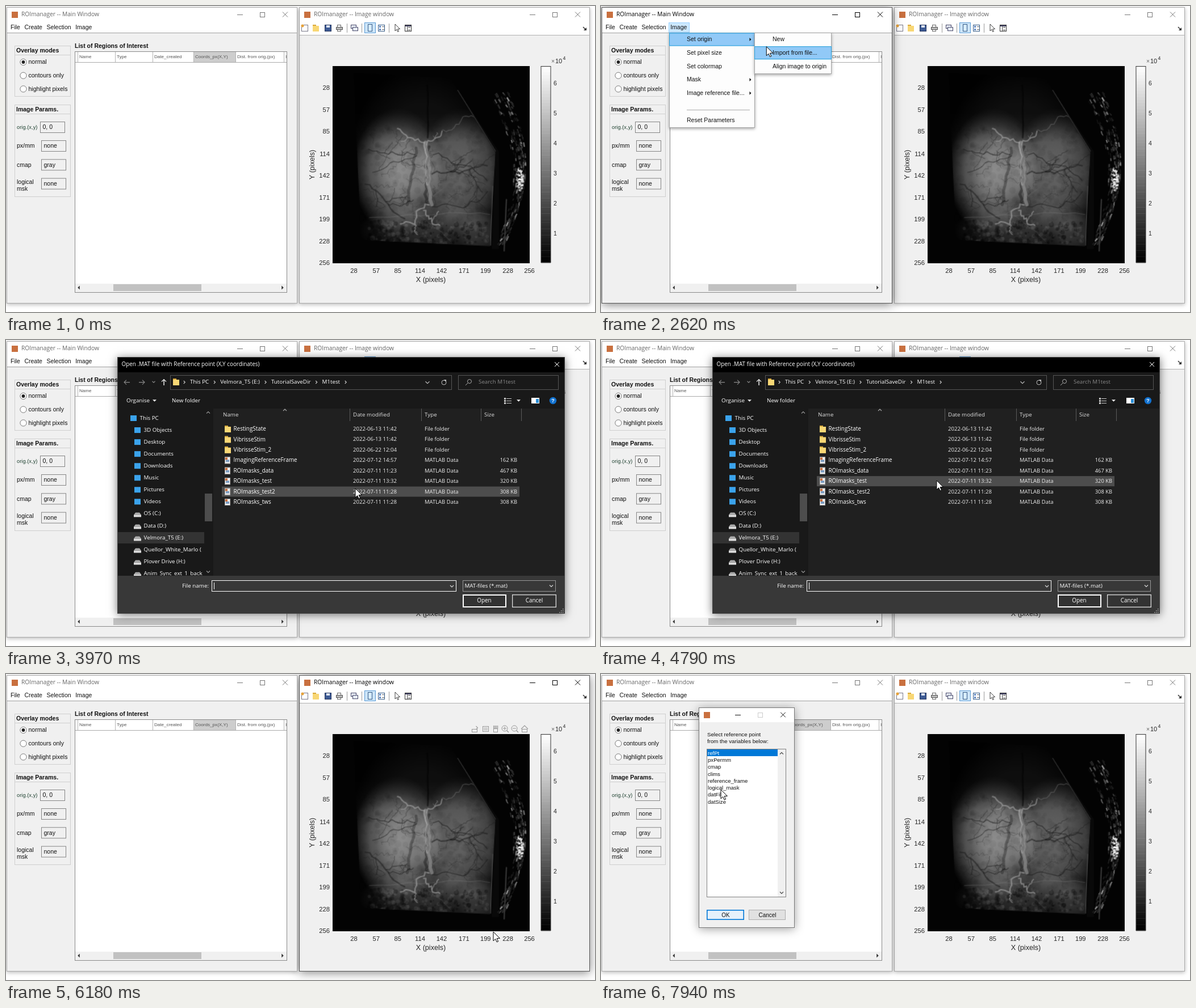
An HTML page with a canvas that plays this animation: 1037x540 px, repeating every 8 s.

```html
<!DOCTYPE html>
<html lang="en">
<head>
<meta charset="utf-8">
<title>ROI manager walkthrough</title>
<style>
html, body { margin: 0; width: 100%; height: 100%; overflow: hidden; background: #fff; }
canvas { display: block; }
</style>
</head>
<body>
<canvas id="stage" width="1037" height="540"></canvas>
<script>
const LOOP = 8000;
const ARIAL = '"Liberation Sans", Arial, sans-serif';
const UI = '"Open Sans", "Noto Sans", sans-serif';
const LOGO = '#c9703f';
const stage = document.getElementById('stage').getContext('2d');
let g = stage;

// ---- drawing helpers ----
function box(x, y, w, h, fill, stroke, lw = 1) {
  if (fill) { g.fillStyle = fill; g.fillRect(x, y, w, h); }
  if (stroke) {
    g.strokeStyle = stroke; g.lineWidth = lw;
    g.strokeRect(x + lw / 2, y + lw / 2, w - lw, h - lw);
  }
}
// Returns the x where the text ends, so that labels can follow each other.
function text(s, x, y, size = 10.5, color = '#111', font = ARIAL, align = 'left', weight = '') {
  g.font = `${weight} ${size}px ${font}`;
  g.fillStyle = color; g.textAlign = align; g.textBaseline = 'middle';
  g.fillText(s, x, y + .5);
  return x + g.measureText(s).width;
}
const ui = (s, x, y, color = '#fff', size = 9.8, align) => text(s, x, y, size, color, UI, align);
const bold = (s, x, y) => text(s, x, y, 10.5, '#111', ARIAL, 'left', 'bold');
function trace(p) {
  g.beginPath();
  for (let i = 0; i < p.length; i += 2) g.lineTo(p[i], p[i + 1]);
}
function line(color, lw, ...p) { g.strokeStyle = color; g.lineWidth = lw; trace(p); g.stroke(); }
function poly(fill, ...p) { g.fillStyle = fill; trace(p); g.fill(); }
function disc(x, y, r, fill, stroke) {
  g.beginPath(); g.arc(x, y, r, 0, 7);
  if (fill) { g.fillStyle = fill; g.fill(); }
  if (stroke) { g.strokeStyle = stroke; g.lineWidth = 1; g.stroke(); }
}
// Arrow heads; turn is in quarter turns, 0 points right.
function turned(x, y, turn, draw) {
  g.save(); g.translate(x, y); g.rotate(turn * Math.PI / 2); draw(); g.restore();
}
const chevron = (x, y, s, color, turn = 0) => turned(x, y, turn, () => line(color, 1.1, -s / 2, -s, s / 2, 0, -s / 2, s));
const triangle = (x, y, s, color, turn = 0) => turned(x, y, turn, () => poly(color, -s / 2, -s, s / 2, 0, -s / 2, s));
function cross(x, y, s, color) {
  line(color, 1, x - s, y - s, x + s, y + s);
  line(color, 1, x + s, y - s, x - s, y + s);
}
function panel(x, y, w, h, fill, border, blur, alpha) {
  g.save();
  g.shadowBlur = blur; g.shadowColor = `rgba(0,0,0,${alpha})`; g.shadowOffsetY = 2;
  box(x, y, w, h, fill);
  g.restore();
  if (border) box(x, y, w, h, null, border);
}
const clamp = v => Math.max(0, Math.min(1, v));
const smooth = v => v * v * (3 - 2 * v);
const ramp = (t, from, to) => smooth(clamp((t - from) / (to - from)));
// Draws a window that fades and grows around its centre.
function appear(x, y, alpha, draw) {
  const s = .92 + .08 * alpha;
  g.save();
  g.globalAlpha = alpha;
  g.translate(x, y); g.scale(s, s); g.translate(-x, -y);
  draw();
  g.restore();
}

// ---- microscope picture: painted once at 256 pixels, shown enlarged ----
let seed = 7;
const rnd = () => (seed = seed * 16807 % 2147483647) / 2147483647;
const gray = (v, a = 1) => `rgba(${v | 0},${v | 0},${v | 0},${a})`;

function glow(x, y, rx, ry, v) {
  g.save(); g.translate(x, y); g.scale(1, ry / rx);
  const r = g.createRadialGradient(0, 0, 0, 0, 0, rx);
  r.addColorStop(0, gray(v)); r.addColorStop(.6, gray(v, .75)); r.addColorStop(1, gray(v, 0));
  box(-rx, -rx, 2 * rx, 2 * rx, r);
  g.restore();
}
function vein(x, y, dx, dy, w, color, wobble = .12, branches = 3) {
  const n = 12, pts = [];
  let side = 0;
  for (let i = 0; i <= n; i++) {
    const u = i / n;
    side += (rnd() - .5) * wobble;
    pts.push(x + dx * u - dy * side, y + dy * u + dx * side);
  }
  g.lineJoin = g.lineCap = 'round';
  line(color, w, ...pts);
  g.lineJoin = 'miter'; g.lineCap = 'butt';
  for (let i = 0; i < branches; i++) {
    const k = 2 * (2 + Math.floor(rnd() * 8)), turn = (i % 2 ? 1 : -1) * (.5 + .5 * rnd()), s = .25 + .25 * rnd();
    const c = Math.cos(turn) * s, d = Math.sin(turn) * s;
    vein(pts[k], pts[k + 1], dx * c - dy * d, dx * d + dy * c, w * .6, color, wobble, w > 2 ? 1 : 0);
  }
}
function paintBrain() {
  const c = document.createElement('canvas');
  c.width = c.height = 256;
  g = c.getContext('2d');
  g.scale(256 / 347, 256 / 347);
  g.translate(-575, -106);
  box(575, 106, 347, 347, '#030303');
  g.save();
  trace([612, 118, 782, 128, 862, 255, 852, 423, 625, 412]);
  g.clip();
  g.globalCompositeOperation = 'lighter';
  glow(735, 270, 130, 165, 34);
  glow(690, 292, 80, 112, 82);
  glow(805, 292, 82, 112, 72);
  glow(700, 290, 50, 65, 28);
  glow(750, 395, 130, 50, 30);
  glow(838, 400, 45, 40, 30);
  g.globalCompositeOperation = 'source-over';
  const top = g.createLinearGradient(0, 190, 0, 240);
  top.addColorStop(0, gray(0, .5)); top.addColorStop(1, gray(0, 0));
  box(600, 110, 270, 130, top);

  // cloudy texture, denser along the lower edge
  for (let i = 0; i < 420; i++)
    disc(625 + 235 * rnd(), 210 + 170 * rnd(), 2 + 5 * rnd(), gray(0, .05));
  for (let i = 0; i < 260; i++)
    disc(635 + 215 * rnd(), 378 + 42 * rnd(), 1 + 3.5 * rnd(), rnd() < .65 ? gray(0, .28) : gray(150, .13));

  const dark = gray(25, .5);
  vein(634, 311, 78, 46, 2.6, dark);
  vein(638, 248, 80, -8, 1.7, dark);
  vein(645, 292, 78, -28, 1.4, dark);
  vein(750, 298, 95, 8, 2.6, dark);
  vein(752, 260, 100, 32, 1.8, dark);
  vein(752, 358, 95, -34, 1.7, dark);
  for (let i = 0; i < 26; i++) {
    const a = 6.3 * rnd(), len = 20 + 20 * rnd();
    vein((i % 2 ? 755 : 640) + 80 * rnd(), 235 + 120 * rnd(), len * Math.cos(a), len * Math.sin(a), 1, gray(20, .3), .3, 1);
  }
  vein(741, 140, 0, 92, 3, gray(0, .5), .02, 0);
  vein(725, 250, 0, 100, 5, gray(0, .28), .08, 0);
  vein(748, 248, 0, 100, 5, gray(0, .35), .08, 0);

  const pale = gray(165, .6);
  vein(737, 240, 1, 110, 6, gray(150, .6), .06, 0);
  vein(737, 240, 1, 75, 2.5, gray(200, .4), .08, 0);
  vein(737, 242, -50, -20, 2.4, pale, .2, 1);
  vein(739, 242, 30, -20, 2.2, pale, .2, 1);
  vein(770, 222, 58, -14, 1.6, gray(140, .35), .2, 0);
  vein(742, 346, -50, 34, 2.6, pale, .3, 1);
  vein(738, 356, 32, 20, 2.4, pale, .3, 1);
  vein(640, 375, 212, 1, 1.5, gray(140, .25), .03, 2);
  g.restore();

  // holder edge and speckled rim on the right
  poly('#090909', 788, 138, 868, 256, 868, 428, 855, 428, 862, 258);
  line(gray(75), 1, 795, 148, 862, 256);
  line(gray(80), 1.2, 857, 317, 853, 422);
  for (let i = 0; i < 300; i++) {
    const u = rnd(), edge = 868 + 47 * Math.sin(Math.PI * (.1 + .82 * u));
    const x = edge - 32 * rnd() ** 1.6 * (1 - .6 * u), y = 152 + 265 * u;
    line(gray(25 + 150 * rnd() ** 3), .7 + 1.8 * rnd(), x, y, x + 4 - 8 * u, y + 3 + 5 * rnd());
  }
  for (let i = 0; i < 90; i++) {
    const a = 6.3 * rnd(), r = Math.sqrt(rnd());
    disc(905 + 7 * r * Math.cos(a), 304 + 22 * r * Math.sin(a), 1.5, gray(255, 1.05 - r * .7));
  }
  line(gray(60), 2, 881, 340, 877, 432);
  g = stage;
  return c;
}
const brain = paintBrain();

// ---- windows ----
function frame(x, title, active) {
  panel(x, 2, 512, 523, '#f0f0f0', active ? '#555' : '#aaa', active ? 16 : 7, active ? .5 : .28);
  box(x + 1, 3, 510, 45, '#fff');
  box(x + 9, 10, 11, 11, LOGO);
  const ink = active ? '#000' : '#777';
  text(title, x + 26, 15, 10.25, active ? '#000' : '#666', UI);
  line(ink, 1, x + 406, 15.5, x + 416, 15.5);
  box(x + 446, 11, 9, 9, null, ink);
  cross(x + 490.5, 15, 4.5, ink);
}
function group(title, y, h) {
  box(15, y, 99, h, null, '#cfcfcf');
  box(15, y + 16, 99, 1, '#cfcfcf');
  bold(title, 18, y + 8.5);
}
function field(s, x, y) {
  box(x, y - 10, 44, 20, '#f0f0f0', '#858585');
  text(s, x + 4.5, y);
}
function mainWindow(active, menuOpen) {
  frame(1, 'ROImanager -- Main Window', active);
  if (menuOpen) box(119, 29, 37, 18, '#cce8ff', '#99d1ff');
  let x = 8;
  for (const s of ['File', 'Create', 'Selection', 'Image']) x = text(s, x, 38) + 7.5;
  box(2, 47, 510, 1, '#a0a0a0');

  group('Overlay modes', 70, 90);
  ['normal', 'contours only', 'highlight pixels'].forEach((s, i) => {
    const y = 99 + 23.7 * i;
    disc(30.5, y, 5.6, '#fff', '#777');
    if (!i) disc(30.5, y, 2.9, '#222');
    text(s, 39.5, y);
  });
  group('Image Params.', 174, 163);
  text('orig.(x,y)', 19, 214, 9.4, '#243');
  field('0, 0', 60, 214);
  ['none', 'gray', 'none'].forEach((s, i) => field(s, 62, 247 + 33.3 * i));
  text('px/mm', 19, 247); text('cmap', 19, 280.5);
  text('logical', 19, 310.5); text('msk', 19, 322.5);

  bold('List of Regions of Interest', 121, 71);
  box(121, 80, 374, 426, '#fff', '#8a8a8a');
  box(330, 81, 74, 18, '#cdcdcd');
  box(122, 99, 372, 1, '#aaa');
  const columns = { Name: 126, Type: 192, Date_created: 258, 'Coords_px(X,Y)': 330, 'Dist. from orig.(px)': 404, I: 489 };
  for (const s in columns) {
    box(columns[s], 81, 1, 18, '#b5b5b5');
    text(s, columns[s] + 3, 89.5, 8.1, '#555');
  }
  box(122, 490, 372, 15, '#f0f0f0');
  box(189, 491, 155, 12, '#c1c1c1');
  triangle(128, 497, 3.5, '#333', 2);
  triangle(487, 497, 3.5, '#333');
}

function toolbar() {
  const page = (x, border) => box(x, 33, 12, 12, '#fff', border);
  page(520, '#778'); disc(522, 35, 2.5, '#e8a33a');
  folder(540, 39);
  page(561, '#22335c'); box(562, 34, 10, 10, '#3d5a94'); box(564, 34, 6, 4, '#dde6f5');
  box(583, 33, 7, 12, '#fff', '#666'); box(581, 37, 12, 5, '#bbb', '#555');
  for (const x of [600, 626, 674]) box(x, 31, 1, 16, '#999');
  for (const i of [0, 3]) box(607 + i, 33 + 1.4 * i, 10, 7, '#e8eef6', '#446');
  box(631, 29, 20, 19, '#cce4f7', '#5b9bd5'); box(637, 32, 8, 13, '#d6ecff', '#345a85');
  page(655, '#345a85'); page(702, '#333');
  box(703, 34, 10, 2, '#446'); box(706, 36, 1, 8, '#444');
  for (const y of [36, 41]) { box(657, y - 1, 3, 3, '#5b84c4'); box(662, y, 4, 1, '#666'); box(708, y + 1, 4, 1, '#444'); }
  arrow(685, 32, .75);
  line('#222', 1.2, 1016, 37, 1020, 41); poly('#222', 1022, 38, 1022, 43, 1017, 43);
}
function axesTools() {
  const c = '#999';
  box(820, 97, 10, 6, null, c); chevron(829, 95, 3, c);
  box(839, 92, 11, 10, null, c); box(841, 95, 7, 1, c); box(841, 98, 7, 1, c);
  box(858, 96, 8, 7, null, c);
  for (let i = 0; i < 4; i++) box(858 + 2.3 * i, 91, 1.3, 6, c);
  for (const x of [878, 895]) { disc(x, 96, 5, null, c); line(c, 1.5, x + 3.5, 99.5, x + 7, 103); box(x - 3, 95.5, 6, 1, c); }
  box(877.5, 93, 1, 6, c);
  box(908, 97, 10, 6, null, c); chevron(913, 94, 6, c, -1);
}

function imageWindow(active, tools) {
  frame(516, 'ROImanager -- Image window', active);
  box(517, 28, 510, 23, '#fff');
  box(517, 51, 510, 1, '#b0b0b0');
  toolbar();
  g.drawImage(brain, 575, 106, 347, 348);
  const ink = '#262626';
  for (let i = 1; i <= 9; i++) {
    const v = Math.round(i * 256 / 9), d = v / 256 * 347;
    text(v, 574.5 + d, 467, 11.2, ink, ARIAL, 'center');
    text(v, 570, 106.5 + d, 11.2, ink, ARIAL, 'right');
  }
  text('X (pixels)', 748, 483, 12.6, ink, ARIAL, 'center');
  turned(539, 280, -1, () => text('Y (pixels)', 0, 0, 12.6, ink, ARIAL, 'center'));
  for (let i = 0; i < 64; i++) box(942, 106 + i * 347 / 64, 17, 5.8, gray(255 * (1 - i / 63)));
  box(941.5, 106, 18, 347, null, '#333');
  for (let i = 1; i < 7; i++) text(i, 964, 454.5 - 53 * i, 10.5, ink);
  text('×', 960, 97.5, 10.5, '#666'); text('10', 967, 97.5, 11, ink); text('4', 980.5, 92, 8.6, ink);
  if (tools) axesTools();
}

// ---- menus ----
const menuY = n => 59 + 23.7 * n;
function menu(x, w, h, lit, textX, items) {
  panel(x, 47, w, h, '#fdfdfd', '#a5a5a5', 5, .35);
  if (lit >= 0) box(x, menuY(lit) - 11.5, w, 23, '#91c9f7', '#26a0da');
  items.forEach((s, i) => text(s, textX, menuY(i)));
}
function menus(t, c) {
  menu(120, 151, 168, 0, 151,
    ['Set origin', 'Set pixel size', 'Set colormap', 'Mask', 'Image reference file...', '', 'Reset Parameters']);
  box(151, 183, 111, 1, '#aaa');
  for (const i of [0, 3, 4]) triangle(263, menuY(i), 3, '#111');
  if (t < 1700) return;
  menu(270, 136, 73, c.x > 271 ? Math.round((c.y - 59) / 23.7) : -1, 302, ['New', 'Import from file...', 'Align image to origin']);
}

// ---- file chooser ----
const folders = { RestingState: '06-13 11:42', VibrisseStim: '06-13 11:42', VibrisseStim_2: '06-22 12:04' };
const files = {
  ImagingReferenceFrame: '07-12 14:57 162', ROImasks_data: '07-11 11:23 467', ROImasks_test: '07-11 13:32 320',
  ROImasks_test2: '07-11 11:28 308', ROImasks_tws: '07-11 11:28 308'
};
const rows = Object.entries({ ...folders, ...files });
const places = ['This PC', '3D Objects', 'Desktop', 'Documents', 'Downloads', 'Music', 'Pictures', 'Videos', 'OS (C:)',
  'Data (D:)', 'Velmora_T5 (E:)', 'Quellor_White_Marlo (', 'Plover Drive (H:)', 'Anim_Sync_ext_1_back'];

function folder(x, y) {
  box(x, y - 6, 6, 10, '#d9a93a');
  box(x, y - 4, 11, 10, '#f8d775');
}
function placeIcon(x, y, isDrive) {
  if (!isDrive) return box(x, y - 5, 11, 10, '#3ba3ec');
  poly('#aaa', x + 2, y - 2, x + 9, y - 2, x + 12, y + 2, x - 1, y + 2);
  box(x - 1, y + 2, 13, 4, '#ddd');
}
function chooser(t, c) {
  const picked = t >= 5140;
  panel(196, 30, 788, 453, '#202020', null, 15, .55);
  box(196, 30, 788, 27, '#000');
  ui('Open .MAT file with Reference point (X,Y coordinates)', 203.5, 43, '#fff', 9.9);
  cross(970, 43, 4, '#fff');
  box(196, 57, 788, 64, '#191919');

  // navigation row
  box(208, 74, 10, 1.3, '#888'); chevron(210, 74.6, 4, '#888', 2);
  box(234, 74, 10, 1.3, '#888'); chevron(242, 74.6, 4, '#888');
  chevron(260, 74, 2.5, '#888', 1);
  box(277.3, 70, 1.5, 10, '#eee'); chevron(278, 71.5, 4, '#eee', -1);
  box(289, 62, 496, 26, null, '#555');
  folder(294, 74);
  let x = 304;
  for (const s of ['This PC', 'Velmora_T5 (E:)', 'TutorialSaveDir', 'M1test', '']) {
    chevron(x + 10, 74.5, 2.5, '#ccc');
    x = ui(s, x + 20, 74);
  }
  chevron(742, 75, 3.5, '#bbb', 1);
  disc(771, 75, 4, null, '#bbb'); triangle(774, 71, 3, '#bbb', -.5);
  box(796, 62, 177, 26, null, '#555');
  disc(816, 73, 3.5, null, '#aaa'); line('#aaa', 1, 813, 76, 809, 80);
  ui('Search M1test', 832, 74, '#888');

  // command row
  ui('Organise', 212, 106.5); triangle(261.5, 107, 3.5, '#eee', 1);
  ui('New folder', 292, 106.5);
  for (let i = 0; i < 3; i++) { box(877, 102 + 4 * i, 3, 3, '#ccc'); box(881, 103 + 4 * i, 9, 1, '#ccc'); }
  triangle(902.5, 107, 3.5, '#eee', 1);
  box(925, 102, 14, 10, '#fff'); box(933, 104, 5, 7, '#2a8fd8');
  disc(963, 107, 6.2, '#1272d0'); text('?', 963, 107, 9.5, '#fff', ARIAL, 'center', 'bold');

  // places
  box(196, 121, 169, 295, '#191919');
  box(197, 339, 152, 20, '#333');
  places.forEach((s, i) => {
    const y = 138 + 21.05 * i, indent = i ? 226 : 219;
    placeIcon(indent, y, i > 7);
    ui(s, indent + 16.5, y);
  });
  box(350, 271, 13, 49, '#4d4d4d');
  chevron(356, 128, 3, '#999', -1); chevron(356, 409, 3, '#999', 1);

  // file list
  ui('Name', 382, 132, '#ddd');
  const columns = { 'Date modified': 605, Type: 731, Size: 836, '': 907 };
  for (const s in columns) {
    box(columns[s], 121, 1, 22, '#5a5a5a');
    ui(s, columns[s] + 6, 132, '#ddd');
  }
  chevron(491, 123.5, 3, '#aaa', -1);
  const hover = c.x > 380 && c.x < 904 ? Math.round((c.y - 157.5) / 18.43) : -1;
  rows.forEach(([name, info], i) => {
    const y = 157 + 18.43 * i, [day, time, size] = info.split(' ');
    if (picked && name === 'ImagingReferenceFrame') box(380, y - 9, 524, 18, '#777', '#999');
    else if (i === hover) box(380, y - 9, 524, 18, '#4d4d4d');
    if (size) {
      box(385, y - 6, 10, 12, '#f2f2f2', '#aaa'); box(387, y - 1, 6, 4, '#7a9bc0'); box(386, y - 5, 4, 4, LOGO);
      ui(size + ' KB', 900, y, '#eee', 9.4, 'right');
    } else folder(385, y);
    ui(name, 400.5, y, '#fff', 9.9);
    ui(`2022-${day} ${time}`, 611, y, '#eee', 9.6);
    ui(size ? 'MATLAB Data' : 'File folder', 737, y, '#eee', 9.5);
  });

  // bottom panel
  box(196, 416, 788, 67, '#383838');
  ui('File name:', 357, 433.5, '#fff', 9.8, 'right');
  box(362, 424, 431, 20, '#383838', picked ? '#999' : '#fff');
  if (picked) ui('ImagingReferenceFrame', 365.5, 434, '#fff', 9.9);
  else if (t % 1000 > 400) box(366, 428, 1, 12, '#fff');
  chevron(785, 434.5, 3, '#ddd', 1);
  box(804, 424, 164, 20, '#383838', '#999');
  ui('MAT-files (*.mat)', 807.5, 433.5);
  chevron(960, 434, 3, '#ddd', 1);
  box(804, 449, 77, 23, '#333', '#fff', 2);
  box(891, 449, 78, 23, '#333', '#ddd', 1.3);
  ui('Open', 842, 460, '#fff', 9.9, 'center'); ui('Cancel', 930, 460, '#fff', 9.9, 'center');
  for (let i = 0; i < 3; i++) for (let j = 0; j <= i; j++) box(980 - 3 * j, 474 + 3 * i, 1.5, 1.5, '#aaa');
  box(196, 30, 788, 453, null, '#444');
}

// ---- variable picker ----
function picker() {
  panel(172, 59, 169, 389, '#f0f0f0', '#777', 16, .38);
  box(173, 60, 167, 25, '#fff');
  box(181, 67, 11, 11, LOGO);
  line('#111', 1, 236, 72.5, 246, 72.5);
  box(276, 68, 9, 9, null, '#ccc');
  cross(320.5, 72, 4.3, '#111');
  text('Select reference point', 187, 107, 9.7);
  text('from the variables below:', 187, 119.3, 9.7);
  box(186, 132, 140, 262, '#fff', '#828282');
  box(187, 133, 124, 12, '#0078d7');
  ['refPt', 'pxPermm', 'cmap', 'clims', 'reference_frame', 'logical_mask', 'datFile', 'datSize']
    .forEach((s, i) => text(s, 188, 139.5 + 12.3 * i, 9.6, i ? '#111' : '#fff'));
  box(311, 133, 14, 260, '#f0f0f0');
  chevron(318, 140, 3, '#444', -1); chevron(318, 386, 3, '#444', 1);
  box(186, 416, 66, 18, '#e5f1fb', '#0078d7', 1.6);
  box(260, 416, 65, 18, '#e1e1e1', '#adadad');
  text('OK', 219.5, 425.5, 10, '#111', ARIAL, 'center');
  text('Cancel', 293, 425.5, 10, '#111', ARIAL, 'center');
}

// ---- pointer: each move is start, end, and the point it reaches ----
const moves = [
  [170, 910, 120, 20], [980, 1110, 111, 15], [1110, 1250, 118, 26], [1400, 1790, 166, 52], [2220, 2830, 338, 79],
  [3650, 3970, 615, 262], [4650, 5060, 527, 211], [5480, 5760, 858, 455], [6640, 7120, 237, 414],
  [7190, 7540, 226, 145], [7540, 7940, 211, 204]];
function pointer(t) {
  let x = 962, y = 541;
  for (const [from, to, toX, toY] of moves) {
    const u = ramp(t, from, to);
    x += (toX - x) * u;
    y += (toY - y) * u;
  }
  const shown = t < 3060 || t >= 3720 && t < 6240 || t >= 6640;
  return { x, y, shown };
}
function arrow(x, y, s = 1) {
  g.save(); g.translate(x, y); g.scale(s, s);
  poly('#fff', 0, 0, 0, 16, 3.7, 12.6, 6.2, 18, 8.6, 17, 6.2, 11.6, 11.4, 11.4);
  g.closePath(); g.strokeStyle = '#000'; g.lineWidth = 1; g.stroke();
  g.restore();
}

function render(t) {
  const c = pointer(t);
  const overAxes = c.shown && c.x > 575 && c.x < 922 && c.y > 106 && c.y < 454;
  box(0, 0, 1037, 540, '#fff');
  imageWindow(t >= 6040 && t < 6320, overAxes || t >= 6040 && t < 6640);
  const menuAlpha = ramp(t, 1460, 1580) * (1 - ramp(t, 2970, 3090));
  mainWindow(t >= 1430 && t < 3320, menuAlpha > 0);
  if (menuAlpha) {
    g.globalAlpha = menuAlpha;
    menus(t, c);
    g.globalAlpha = 1;
  }
  const chooserAlpha = ramp(t, 3640, 3840) * (1 - ramp(t, 5960, 6080));
  if (chooserAlpha) appear(590, 256, chooserAlpha, () => chooser(t, c));
  const pickerAlpha = ramp(t, 6400, 6600);
  if (pickerAlpha) appear(256, 253, pickerAlpha, picker);
  if (c.shown) arrow(c.x, c.y);
}
function tick() {
  render(performance.now() % LOOP);
  requestAnimationFrame(tick);
}
tick();
</script>
</body>
</html>
```
